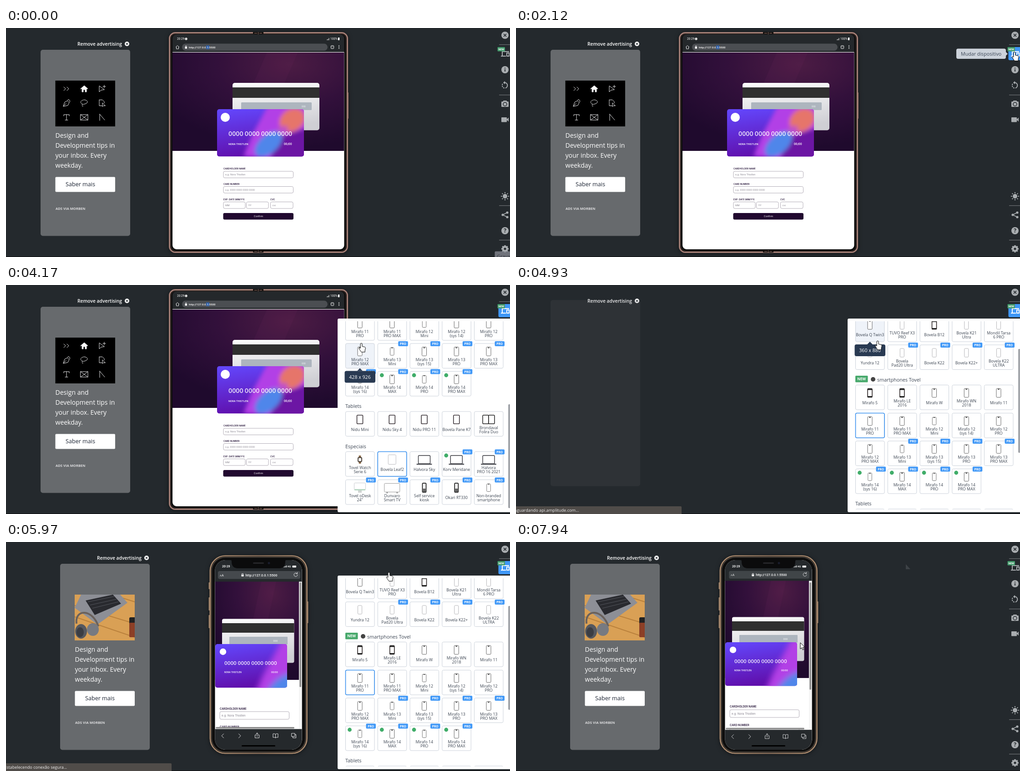
An HTML page that plays this animation: 1108x505 px, repeating every 8 s.

```html
<!DOCTYPE html>
<html lang="pt">
<head>
<meta charset="utf-8">
<title>Device simulator</title>
<style>
@property --c { syntax: '<number>'; inherits: true; initial-value: 0; }
html, body { margin: 0; width: 100%; height: 100%; overflow: hidden; background: #24292d; }
svg { display: block; }
text { font-family: 'Open Sans', 'Noto Sans', sans-serif; white-space: pre; }
.r { font-family: Roboto, sans-serif; }
.i { font-family: Inter, sans-serif; }
.line { fill: none; stroke: #e4e4e6; stroke-linecap: round; stroke-linejoin: round; }

.hard { animation: 8s step-end infinite; }
.soft { animation: 8s linear infinite; }

#record { animation-name: record; }
@keyframes record { 0% { opacity: 1 } .875%, 100% { opacity: 0 } }
#fold, #icons { animation-name: before; }
@keyframes before { 0% { opacity: 1 } 55.6%, 100% { opacity: 0 } }
#phone, #photo { animation-name: after; }
@keyframes after { 0% { opacity: 0 } 62.5%, 100% { opacity: 1 } }
#smudge { animation-name: smudge; }
@keyframes smudge { 0% { opacity: 0 } 78.5%, 100% { opacity: 1 } }

#ad { animation-name: ad; }
@keyframes ad { 0% { transform: none } 62.5%, 100% { transform: translateX(43px) } }
#box { animation-name: box; }
@keyframes box {
  0%, 55.6% { opacity: 1; transform: translateY(0) }
  55.61% { opacity: .03; transform: translateY(-15px) }
  61.6% { opacity: .15; transform: translateY(-15px) }
  65.2%, 100% { opacity: 1; transform: translateY(0) }
}
#content { animation-name: content; }
@keyframes content { 0% { opacity: 1 } 55.6% { opacity: 0 } 71%, 100% { opacity: 1 } }

#active { animation-name: active; }
@keyframes active { 0% { opacity: 0 } 22.5% { opacity: 1 } 77.5%, 100% { opacity: 0 } }
#hint { animation-name: hint; }
@keyframes hint { 0%, 23.5% { opacity: 0 } 25%, 28% { opacity: 1 } 29.1%, 100% { opacity: 0 } }

#panel { animation-name: panel; }
@keyframes panel {
  0%, 29.9% { opacity: 0; transform: translateX(-20px) }
  31.8%, 77.5% { opacity: 1; transform: none }
  78.4%, 100% { opacity: 0; transform: none }
}
#list { animation-name: list; }
@keyframes list {
  0%, 33.8% { transform: translateY(111px) }
  39.4%, 57.5% { transform: translateY(-215px) }
  61.2%, 100% { transform: none }
}
#thumb { animation-name: thumb; }
@keyframes thumb {
  0%, 33.8% { transform: translateY(-63px) }
  39.4%, 57.5% { transform: translateY(122px) }
  61.2%, 100% { transform: none }
}
#oldPick { animation-name: before; }
#newPick { animation-name: newPick; }
@keyframes newPick { 0% { opacity: 0 } 55%, 100% { opacity: 1 } }
.hoverA { animation-name: hoverA; }
@keyframes hoverA { 0% { opacity: 0 } 46.2% { opacity: 1 } 53%, 100% { opacity: 0 } }
.hoverB { animation-name: hoverB; }
@keyframes hoverB { 0% { opacity: 0 } 60.8% { opacity: 1 } 63.5%, 100% { opacity: 0 } }
#fading { animation-name: fading; }
@keyframes fading { 0%, 64.1% { opacity: 0 } 64.2% { opacity: .6 } 66% { opacity: .2 } 67%, 100% { opacity: 0 } }

#status { animation-name: status; }
@keyframes status { 0% { opacity: 0 } 55.8% { opacity: 1 } 75%, 100% { opacity: 0 } }
#waiting { animation-name: waiting; }
@keyframes waiting { 0% { opacity: 1 } 63.5%, 100% { opacity: 0 } }
#securing { animation-name: securing; }
@keyframes securing { 0% { opacity: 0 } 63.5%, 100% { opacity: 1 } }
#progress { animation-name: progress; }
@keyframes progress { 0% { opacity: 1 } 70%, 100% { opacity: 0 } }

/* --c is how far the mobile browser bars are collapsed */
#phone { animation: after 8s step-end infinite, collapse 8s linear infinite; }
@keyframes collapse {
  0%, 82.5% { --c: 0 } 83.37% { --c: .35 } 84.2% { --c: .75 } 85.1%, 94.1% { --c: 1 }
  95% { --c: .85 } 95.9% { --c: .62 } 96.8% { --c: .4 } 97.7% { --c: .24 } 98.5% { --c: .17 } 99.2%, 100% { --c: .12 }
}
#page { transform: translateY(calc(var(--c) * -34px)); }
#topBar { transform: translateY(calc(var(--c) * -16px)); }
#field { transform-origin: 556px 72.5px; transform: translateY(calc(var(--c) * -4px)) scale(calc(1 - .19 * var(--c))); }
.away { opacity: calc(1 - var(--c)); }
.bottom { transform: translateY(calc(var(--c) * 10px + var(--c) * var(--c) * 33px)); }
#vScroll { transform-origin: 647px 89px; transform: scaleY(calc(1 + .21 * var(--c))); }

#cursor { animation-name: cursor; }
@keyframes cursor {
  0%, 8.9% { transform: translate(1066px, 520px) }
  9% { transform: translate(1066px, 492px) }
  13.5% { transform: translate(1054px, 300px) }
  18.5% { transform: translate(1065px, 99px) }
  23.5%, 31% { transform: translate(1096px, 53px) }
  35% { transform: translate(960px, 230px) }
  39.5%, 40.2% { transform: translate(866px, 346px) }
  47.1%, 52.1% { transform: translate(781px, 129px) }
  54%, 57% { transform: translate(785px, 100px) }
  61.6% { transform: translate(795px, 123px) }
  63.6% { transform: translate(797px, 138px) }
  66%, 71% { transform: translate(801px, 117px) }
  76%, 78.5% { transform: translate(857px, 48px) }
  82.5%, 84% { transform: translate(622px, 224px) }
  85.1%, 100% { transform: translate(625px, 222px) }
}
#hand { animation-name: active; }
#arrow { animation-name: arrow; }
@keyframes arrow { 0% { opacity: 1 } 22.5% { opacity: 0 } 77.5%, 100% { opacity: 1 } }
</style>
</head>
<body>
<svg id="stage" width="1108" height="505" viewBox="0 0 1108 505"></svg>
<script>
const rect = (x, y, w, h, fill, rx = 0, more = '') =>
  `<rect x="${x}" y="${y}" width="${w}" height="${h}" rx="${rx}" fill="${fill}" ${more}/>`;
const circle = (x, y, r, fill, more = '') => `<circle cx="${x}" cy="${y}" r="${r}" fill="${fill}" ${more}/>`;
const text = (x, y, str, size, fill = '#fff', more = '') =>
  `<text x="${x}" y="${y}" font-size="${size}" fill="${fill}" ${more}>${str}</text>`;
const line = (d, width = 1, more = '') => `<path class="line" d="${d}" stroke-width="${width}" ${more}/>`;
const group = (id, body, more = '') => `<g id="${id}" ${more}>${body}</g>`;
const hard = 'class="hard"', soft = 'class="soft"';
const mid = 'text-anchor="middle"', bold = 'font-weight="700"', semi = 'font-weight="600"';

const defs = `<defs>
  <radialGradient id="hero" cx=".68" cy=".12" r=".85"><stop stop-color="#4c1c44"/><stop offset=".5" stop-color="#32103b"/><stop offset="1" stop-color="#1f0a2d"/></radialGradient>
  <linearGradient id="back" x2=".2" y2="1"><stop stop-color="#fdfdfd"/><stop offset="1" stop-color="#cfcfd4"/></linearGradient>
  <linearGradient id="face" x2=".25" y2="1"><stop stop-color="#6348fe"/><stop offset="1" stop-color="#6010ad"/></linearGradient>
  <linearGradient id="gold" x2="1"><stop stop-color="#b08f72"/><stop offset=".5" stop-color="#8a6f5a"/><stop offset="1" stop-color="#b08f72"/></linearGradient>
  <filter id="blur" x="-30%" y="-30%" width="160%" height="160%"><feGaussianBlur stdDeviation="5"/></filter>
  <filter id="shade" x="-10%" y="-10%" width="120%" height="120%"><feDropShadow dx="0" dy="1" stdDeviation="5" flood-opacity=".5"/></filter>
  <clipPath id="foldClip"><rect x="366" y="14" width="377.500" height="474" rx="9"/></clipPath>
  <clipPath id="phoneClip"><rect x="459.500" y="40" width="191" height="418" rx="23"/></clipPath>
  <clipPath id="listClip"><rect x="730" y="80" width="378" height="415"/></clipPath>
  <clipPath id="photoClip"><rect x="108" y="116" width="132" height="101"/></clipPath>
</defs>`;

const hero = (x, y, w, h) => rect(x, y, w, h, 'url(#hero)') +
  `<path d="M${x + w * .3} ${y + h}L${x + w * .55} ${y}h${w * .18}L${x + w * .48} ${y + h}z" fill="#7a2a60" opacity=".1"/>`;

function cardFace(id, x, y, w, h, zoom) {
  return `<clipPath id="${id}"><rect width="${w}" height="${h}" rx="5"/></clipPath>
  <g transform="translate(${x} ${y})" clip-path="url(#${id})">${rect(0, 0, w, h, 'url(#face)')}
  <g transform="scale(${zoom})" filter="url(#blur)">
    <path d="M58 104L78 55 112-8h90v125z" fill="#b23fe6"/>
    <path d="M140 60l60-20v80h-90z" fill="#6c12a4"/>
    <ellipse cx="165" cy="24" rx="30" ry="24" fill="#e6746a" transform="rotate(-35 165 24)"/>
    <ellipse cx="140" cy="50" rx="18" ry="9" fill="#c050c8" transform="rotate(-40 140 50)"/>
    <ellipse cx="113" cy="77" rx="36" ry="20" fill="#4f86ea" transform="rotate(-42 113 77)"/>
  </g></g>`;
}

const input = (x, y, w, h, hint, size) =>
  rect(x + .5, y + .5, w - 1, h - 1, '#fff', 3, 'stroke="#b3aeb8"') +
  text(x + 4.5, y + h * .63, hint, size, '#85808c', 'class="i"');
const label = (x, y, str, size) => text(x, y, str, size, '#2b1a3d', 'class="i" ' + semi);
const holder = 'Nora Thistlen', digits = '0000 0000 0000 0000';

// left column advertisement
function adIcons() {
  const shapes = [
    'M-6-4l4 4-4 4M1-4l4 4-4 4', 'M-8 0L0-7 8 0H5v7H2V2h-4v5h-3V0z', 'M-6-6v13l4-4 7-1zM5-8v6M2-5h6',
    'M-7 7l3-9 6-3 4 4-3 6zM2-6l3-2 3 4-2 2M-7 7l6-6', 'M-4 2c-8-3-2-9 4-9s10 5 4 8-9 1-9 3 4 1 1 4', 'M-6-7h7l4 4v3M-6-7V6h6M1 0v8l2-2 4 0z',
    'M-6-3v-3H6v3M0-6V6M-3 6h6', 'M-8-6H8V6H-8zL8 6M8-6L-8 6', 'M-5-7V7M-5-7L6 6'];
  return rect(108.5, 116, 131.5, 101, '#000') + shapes.map((d, i) =>
    line(d, 1, `transform="translate(${133 + i % 3 * 39} ${134 + (i / 3 | 0) * 31.5})"` + (i == 1 ? ' style="fill:#fff"' : ''))).join('');
}
const photo = `<g clip-path="url(#photoClip)">${rect(108, 116, 132, 101, '#d9a055')}
  <path d="M108 140l132 40M108 165l132 45M190 116l50 16" stroke="#b9803c" stroke-width="2"/>
  <path d="M108 145L122 116h86l16 18-66 48z" fill="#8d8f96"/><path d="M132 129l60-13 18 20-58 25z" fill="#292a2f"/>
  <path d="M137 132l58-12M142 139l58-13M147 146l57-14" stroke="#55575e"/>
  <path d="M112 180c-4-34 36-32 48 6" fill="none" stroke="#6b625c" stroke-width="4"/>
  <ellipse cx="122" cy="197" rx="13" ry="16" fill="#55585f"/><ellipse cx="148" cy="193" rx="13" ry="14" fill="#777a81"/>
  <ellipse cx="120" cy="199" rx="8" ry="11" fill="#3b3d43"/>
  ${rect(228, 166, 14, 18, '#222', 3)}${rect(228, 178, 14, 32, '#8c3f26', 2)}</g>`;
const ad = group('ad',
  text(157, 38.5, 'Remove advertising', 10.3, '#fff', semi) + circle(266, 35, 5, '#fff') +
  '<path d="M264 33l4 4m0-4l-4 4" stroke="#24292d" stroke-width="1.2"/>' +
  group('box', rect(76, 48, 197, 410.5, '#676a6d', 5) + group('content',
    group('icons', adIcons(), hard) + group('photo', photo, hard) +
    ['Design and', 'Development tips in', 'your inbox. Every', 'weekday.'].map((s, i) => text(108.5, 241.5 + i * 22.1, s, 14)).join('') +
    rect(108.5, 328.5, 131.5, 33, '#fff', 2) + text(131, 349, 'Saber mais', 12.6, '#1c2433') +
    text(109, 401, 'ADS VIA MORBEN', 7.6, '#dcdcde', bold), hard), soft), hard);

// unfolded tablet
const hinge = y => rect(543, y, 23, 5, '#15110f') + `<path d="M546 ${y + 2.500}h6m5 0h6M554.500 ${y}v5" stroke="#8d6c63"/>`;
const fold = group('fold', `<g filter="url(#shade)">${rect(750, 142, 3, 58, '#8d6a62', 1)}
  ${rect(359.5, 10.5, 391, 484, '#110e0f', 13, 'stroke="#a57f76" stroke-width="3"')}</g>` +
  rect(362.5, 13, 385, 479, 'none', 11, 'stroke="#4a3833"') + hinge(9) + hinge(490) +
  `<g clip-path="url(#foldClip)">${rect(366, 14, 378, 40, '#24282b')}${rect(366, 53, 378, 436, '#fff')}` +
  text(376, 26.3, '20:29', 6.6, '#fff', 'class="r"') + circle(396, 24, 2.7, '#ddd') +
  '<path d="M706 27v-2m2 2v-3m2 3v-5" stroke="#ddd"/>' + text(713, 26.3, '100%', 6.6, '#fff', 'class="r"') + rect(730, 21, 3.2, 6, '#fff', .5) +
  line('M373.500 42l3.500-3.500 3.500 3.500M374.500 41.500v4.500h5v-4.500') + rect(387, 34.5, 320, 15.5, '#4b4e52', 7.7) +
  rect(393.5, 41.5, 4.5, 4, '#fff', .6) + line('M394.500 41.500v-2h2.500v2') + rect(440, 38.5, 7, 8, '#2f5fa8') +
  text(402, 44.8, 'http://127.0.0.1:5500', 6.15, '#fff', 'class="r" font-weight="500"') +
  rect(714.5, 39, 6, 6.5, 'none', 1, 'stroke="#fff"') + text(717.5, 44.2, '1', 5, '#fff', mid) +
  [39, 42, 45].map(y => circle(732, y, .9, '#fff')).join('') +
  hero(366, 54, 377.5, 217) + rect(498, 121, 191, 104.5, 'url(#back)', 5) + rect(498, 131, 191, 23, '#2f2f2f') +
  rect(517, 164, 155, 17, '#adb5be', 1.5) + text(650, 175, '000', 4.6, '#fff', 'class="i"') + cardFace('wideFace', 464, 179, 191, 104.5, 1) +
  circle(482, 197, 10, '#fff') + text(489, 238.3, digits, 12.6, '#fff', 'class="i" font-weight="500"') +
  text(489, 258, holder.toUpperCase(), 5.4, '#fff', 'class="i" ' + semi) + text(611, 258, '00/00', 5.8, '#fff', 'class="i" ' + semi) +
  label(478, 312, 'CARDHOLDER NAME', 4.8) + input(477.5, 315.5, 154.5, 15.5, 'e.g. ' + holder, 5.3) +
  label(478, 346, 'CARD NUMBER', 4.8) + input(477.5, 349, 154.5, 15.5, 'e.g. ' + digits, 5) +
  label(478, 379.5, 'EXP. DATE (MM/YY)', 4.8) + label(581, 379.5, 'CVC', 4.8) +
  input(477.5, 383, 49, 15.5, 'MM', 5.3) + input(528, 383, 49.5, 15.5, 'YY', 5.3) + input(581, 383, 50.5, 15.5, 'cvc', 4.8) +
  rect(477.5, 408, 154.5, 14.5, '#21092f', 3) + text(555, 417.3, 'Confirm', 5.4, '#fff', 'class="i" ' + mid) + '</g>', hard);

// small phone
const side = (x, y, h) => rect(x, y, 3, h, '#8f7660', 1);
const phone = group('phone', `<g filter="url(#shade)">${side(445.5, 89, 15) + side(445.5, 122, 29) + side(445.5, 161, 29) + side(661.5, 131, 48)}
  ${rect(449, 30.5, 212.5, 435.5, '#0b0b0c', 33, 'stroke="url(#gold)" stroke-width="2.6"')}</g>
  ${rect(452, 33.5, 206.5, 429.5, 'none', 30, 'stroke="#5b5148" stroke-width="1.4"')}
  <g clip-path="url(#phoneClip)">${rect(459, 40, 192, 418, '#fff')}` +
  group('page', hero(459.5, 87, 184.5, 217) + rect(475, 169.5, 158.5, 97, 'url(#back)', 4) + rect(475, 179, 158.5, 21, '#2f2f2f') +
    rect(491, 209, 128, 17, '#adb5be', 1) + text(587.5, 220, '000', 5.2, '#fff', 'class="i"') + cardFace('narrowFace', 460, 225, 158, 96.5, 1.32) +
    circle(477, 242, 7.2, '#fff') + text(480, 271.4, digits, 10.4, '#fff', 'class="i" font-weight="500"') +
    text(480, 289.3, holder.toUpperCase(), 4.7, '#fff', 'class="i" ' + semi) + text(583, 289.3, '00/00', 4.9, '#fff', 'class="i" ' + semi) +
    label(470, 369.5, 'CARDHOLDER NAME', 5.8) + input(469.5, 373.5, 153.5, 18, 'e.g. ' + holder, 6.3) +
    label(470, 410, 'CARD NUMBER', 5.8) + input(469.5, 414.5, 153.5, 18, 'e.g. ' + digits, 6)) +
  rect(644, 60, 7, 400, '#f6f6f6') + rect(645.3, 89, 3.7, 231, '#8d8d8d', 1.8, 'id="vScroll"') +
  group('topBar', rect(459, 20, 192, 67.5, '#25292c')) +
  group('field', rect(466, 64, 181, 17.5, '#45494d', 4, 'class="away"') +
    `<g class="away">${text(470, 76, 'A', 5.6, '#fff')}${text(474, 76, 'A', 7.4, '#fff')}${line('M640 69.500a4 4 0 1 0 1 3M640.500 67v3h-3', 1)}</g>` +
    rect(517.5, 72, 5, 4, '#fff', .7) + line('M518.500 72v-2.200h3v2.200') +
    text(526.5, 75.6, 'http://127.0.0.1:5500', 7.35, '#fff', 'class="r" font-weight="500"') +
    rect(467, 80, 128, 1.3, '#2d8cf0', 0, 'id="progress" class="hard"')) +
  `<g class="bottom">${rect(461, 408, 173, 3.5, '#8d8d8d', 1.7)}${rect(459, 412.5, 192, 60, '#25292c')}
   <g class="away">${line('M478.500 423l-4.500 4.500 4.500 4.500M511.500 423l4.500 4.500-4.500 4.500M549.500 425.500h-2v6.500h9v-6.500h-2M552 429v-8m-2.500 2.500l2.500-2.500 2.500 2.500M592.500 424c-2-1.500-4-1.500-5.500-1v8c2-.5 4-.5 5.500 1 1.500-1.500 3.500-1.500 5.500-1v-8c-2-.5-4-.5-5.500 1zv8M628 422h7v7h-7zM630.500 429v3h7v-7.500h-2.500')}</g></g>` +
  rect(518, 448, 74, 3, '#000', 1.5) +
  text(475, 56, '20:29', 6, '#fff', 'class="i" ' + bold) + text(619, 56, '4G', 5.4, '#fff', 'class="i" ' + semi) +
  '<path d="M611 56v-1.500m2 1.500v-2.500m2 2.500v-3.500m2 3.500v-4.500" stroke="#fff"/>' + rect(629.5, 52, 8.5, 4.3, '#fff', 1) + '</g>' +
  '<path d="M492 38q4 1 4 5 0 15 14 15h90q14 0 14-15 0-4 4-5z" fill="#0b0b0c"/>' + rect(543, 45, 24, 3, '#26262a', 1.5) + circle(578, 46.5, 2.5, '#191c2c'));

// right toolbar
const grey = '#a9adb0', dark = '#24292d';
const rule = y => rect(1084, y, 24, 1.3, '#6a6e71');
const at = (y, body) => `<g transform="translate(1097 ${y})">${body}</g>`;
const stroked = (d, w = 2, c = grey) => `<path d="${d}" fill="none" stroke="${c}" stroke-width="${w}"/>`;
const spokes = (n, r1, r2, w) => Array.from({length: n}, (_, i) =>
  `<path d="M0 ${-r1}V${-r2}" stroke="${grey}" stroke-width="${w}" transform="rotate(${i * 360 / n})"/>`).join('');
const devices = c => at(57, stroked('M-6 4v-9H9M-9 5H2', 2, c) + stroked('M4-2h5v7H4z', 2, c));
const toolbar = rule(36) + rule(147) + rule(391) + rule(467) +
  at(16, circle(0, 0, 8, grey) + stroked('M-3-3l6 6m0-6l-6 6', 1.7, dark)) + devices(grey) +
  at(92, circle(0, 0, 8, grey) + stroked('M0-1v5M0-4.500v2', 1.8, dark)) +
  at(126, stroked('M-3-5.500A6 6 0 0 1 1 6.500') + stroked('M-5-3a6 6 0 0 0 4 9.500', 2).replace('/>', ' stroke-dasharray="3 1.500"/>') + `<path d="M0-9v7l-4-3.500z" fill="${grey}"/>`) +
  at(167, rect(-8, -5, 16, 12, grey, 1.5) + rect(-4, -7, 8, 4, grey, 1) + circle(0, 1, 4, grey, `stroke="${dark}" stroke-width="1.5"`)) +
  at(202, rect(-8, -5, 12, 10.5, grey, 1) + `<path d="M3 0l5-4.500v9z" fill="${grey}"/>`) +
  at(371, circle(0, 0, 5, grey) + spokes(8, 6.5, 9, 2)) +
  at(412, stroked('M5-5L-5 0 5 5', 1.7) + [[5, -5], [-5, 0], [5, 5]].map(p => circle(p[0], p[1], 2.6, grey)).join('')) +
  at(447, circle(0, 0, 8, grey) + text(0, 4.3, '?', 12, dark, mid + ' ' + bold)) +
  at(487, circle(0, 0, 4.5, 'none', `stroke="${grey}" stroke-width="4"`) + spokes(8, 5, 8, 3.4)) +
  group('active', rect(1082.5, 42, 30, 29, '#3f97f6', 3) + devices('#fff'), hard) +
  rect(1080.5, 42, 16.5, 9.5, '#429a6b', 1.5) + text(1088.7, 49, 'NEW', 5.4, '#fff', mid + ' ' + bold) +
  group('record', rect(1074.5, 492.5, 40, 20, '#8a8c96', 2, 'opacity=".75"') + text(1079, 508, 'Gravar', 10.7, '#30343a'), hard);
const hint = group('hint', rect(968, 45.5, 109, 22.5, '#ccd2da', 4) + '<path d="M1077 53l4 4-4 4z" fill="#ccd2da"/>' +
  text(978, 60.6, 'Mudar dispositivo', 10.7, '#3b4656'), soft);

// device list: kind, optional mark (* paid, + new and paid), name with / as line break
const rows = [
  [8.5, 'p Bovela K9;s Bovela K10;p Bovela/K20;s Yundra 11;p Mondil/Tarsa 5'],
  [70, 'p Bovela Q Twin3;s TUVO Reef X3/PRO;b Bovela B12;s Bovela K21/Ultra;s Mondil Tarsa/6 PRO'],
  [131.5, 's Yundra 12;s* Bovela/Pad20 Ultra;s* Bovela K22;s* Bovela K22+;s* Bovela K22/ULTRA'],
  [220, 'b Mirafo 5;b Mirafo LE/2016;p Mirafo W;p Mirafo WN/2018;p Mirafo 11'],
  [282, 'p Mirafo 11/PRO;p Mirafo 11/PRO MAX;q Mirafo 12/Mini;p Mirafo 12/(sys 14);p Mirafo 12/PRO'],
  [343.5, 'p Mirafo 12/PRO MAX;q* Mirafo 13/Mini;p* Mirafo 13/(sys 15);p* Mirafo 13/PRO;p* Mirafo 13/PRO MAX'],
  [405, 'q+ Mirafo 14/(sys 16);p+ Mirafo 14/MAX;q+ Mirafo 14/PRO;p+ Mirafo 14/PRO MAX'],
  [493.5, 't Nidu Mini;t Nidu Sky 4;t Nidu PRO 11;t Bovela Pane K7;d Brondaval/Folira Duo'],
  [582, 'w Tovel Watch/Serie 6;f Bovela Leaf2;l Halvora Sky;l+ Korv Meridane;l* Halvora/PRO 16 2021'],
  [644, 'm* Tovel oDesk/24";v* Dunvaro/Smart TV;k* Self service/kiosk;k* Okari RT330;q* Non-branded/smartphone']];
const frame = (w, h, c, sw = 1, x = 0, y = 0) => rect(x - w / 2, y - h / 2, w, h, '#fff', 1.8, `stroke="${c}" stroke-width="${sw}"`);
const notch = rect(-2, -9, 4, 2, '#555', 1);
const kinds = {
  p: frame(10, 19.5, '#666') + notch, q: frame(8.5, 17, '#777') + notch, s: frame(9, 19, '#b5b5b8'),
  b: frame(10, 19, '#2b2424', 1.6) + rect(-5, -9.5, 10, 3, '#222') + rect(-5, 7, 10, 3, '#222'),
  t: frame(13, 19, '#3b3338', 1.6), d: frame(13, 19, '#222', 1.5, -6.5) + frame(13, 19, '#222', 1.5, 6.5),
  f: frame(17, 21, '#bcbcc0'), w: rect(-2.5, -9, 5, 18, '#8b6a48', 1) + frame(8, 9, '#3d332b', 1.8),
  l: frame(26, 18, '#33343a', 1.4) + rect(-17, 9, 34, 2.5, '#55565c', 1),
  m: frame(25, 15, '#c9ccd0', 1, 0, -3) + rect(-12, 3, 24, 3, '#b9d8c4') + rect(-4, 6, 8, 5, '#d0d4d2'),
  v: frame(34, 19, '#999', 1) + rect(-12, 9.5, 2, 3, '#777') + rect(10, 9.5, 2, 3, '#777'),
  k: frame(8, 20, '#333', 2) + rect(-3, 2, 6, 7, '#666')};
const colX = i => 746.5 + i * 70.75;
function card(item, x, y) {
  const [, kind, mark, name] = item.match(/^(\w)([*+]?) (.*)$/), parts = name.split('/');
  return rect(x, y + .5, 63.5, 54.5, 'none', 3, 'stroke="#cbd1da"') +
    `<g transform="translate(${x + 31.5} ${y + 18})">${kinds[kind]}</g>` +
    parts.map((s, i) => text(x + 31.7, y + (parts[1] ? 39.4 + i * 9 : 43.3), s, 8.7, '#39424f', mid)).join('') +
    (mark ? rect(x + 45, y - 4.5, 21.5, 11, '#4299f7', 2) + text(x + 55.7, y + 3.5, 'PRO', 6.6, '#fff', mid + ' ' + bold) : '') +
    (mark == '+' ? circle(x + 9, y + 9, 4.4, '#40ad69') : '');
}
const hover = (name, y) => rect(746.5, y, 63.5, 55, '#eff3f9', 3, `class="hard ${name}"`);
const pick = (id, col, y) => rect(colX(col), y + .5, 63.5, 54.5, 'none', 3, `id="${id}" class="hard" stroke="#3d93ef" stroke-width="1.6"`);
const heading = (y, str, x = 746) => text(x, y, str, 10.8, '#3d4654');
const size = (y, str, more) => `<g ${more}>${rect(744.500, y, 67.500, 26, '#293a52', 4)}
  <path d="M772 ${y}l6-6 6 6z" fill="#293a52"/>${text(778, y + 17, str, 10.6, '#fff', mid)}</g>`;
const panel = group('panel', rect(729, 74, 390, 427, '#fff', 3) + `<g clip-path="url(#listClip)">` +
  group('list', hover('hoverA', 343.5) + hover('hoverB', 70) +
    rows.map(([y, items]) => items.split(';').map((s, i) => card(s, colX(i), y)).join('')).join('') +
    pick('oldPick', 1, 582) + pick('newPick', 0, 282) + heading(-3, 'smartphones') +
    rect(746, 200, 27.5, 14.5, '#48a96c', 1.5) + text(759.7, 210.3, 'NEW', 8, '#fff', mid + ' ' + bold) + circle(785, 208, 5, '#444') +
    heading(212.6, 'smartphones Tovel', 794) + heading(486, 'Tablets') + heading(575, 'Especiais'), soft) + '</g>' +
  rect(1104, 141, 5, 229, '#a3a6ab', 2, 'id="thumb" class="soft"') +
  size(189.5, '428 x 926', 'class="hard hoverA"') + size(131, '360 x 880', 'class="hard hoverB"') +
  size(192, '360 x 780', 'id="fading" class="soft"'), soft);

const status = group('status', rect(-5, 488, 369, 20, '#504c49', 2) +
  text(-4, 500, 'Aguardando api.amplitude.com...', 9.2, '#f0f0f0', 'id="waiting" class="hard"') +
  text(-4, 500, 'Estabelecendo conexão segura...', 9.1, '#f0f0f0', 'id="securing" class="hard"'), hard);

const pointer = (id, d) => `<path id="${id}" class="hard" d="${d}" fill="#fff" stroke="#000" stroke-linejoin="round"/>`;
const cursor = group('cursor',
  pointer('arrow', 'M0 0v14l3.200-3 2.200 5 2.300-1-2.200-4.800h4.500z') +
  pointer('hand', 'M-2 2Q-2 0 0 0T2 2v5l5.500 1.200Q9.500 9 9.300 11L8 16v3.500H0L-5 12q-1-2.500 1-2.500l2 1.700z'), soft);

document.getElementById('stage').innerHTML = defs + rect(0, 0, 1108, 505, dark) + rect(0, 504, 1108, 1, '#0c0d0e') +
  ad + fold + phone + toolbar + hint +
  '<path id="smudge" class="hard" d="M857 49v11h10z" fill="#3d4246"/>' + panel + status + cursor;
</script>
</body>
</html>
```
